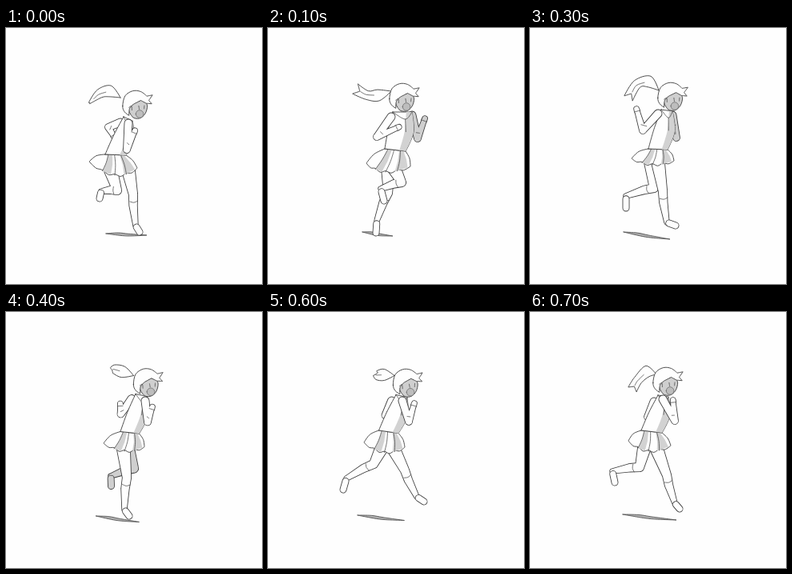
An HTML page for the animation above (800 ms loop, 320 by 320 pixels).

```html
<!DOCTYPE html>
<html lang="en">
<head>
<meta charset="utf-8">
<title>Run cycle</title>
<style>
html, body { margin: 0; width: 100%; height: 100%; overflow: hidden; background: #fefefe; }
svg { display: block; width: 100%; height: 100%; }
path { fill: #fefefe; stroke: #3c3c3c; stroke-width: .9; stroke-linejoin: round; stroke-linecap: round; }
.limb { stroke-width: 1.7; paint-order: stroke; }
.grey { fill: #cfcfcf; }
.shade { fill: #d2d2d2; stroke: none; }
.line { fill: none; stroke-width: .7; }
.mouth { fill: #bdbdbd; stroke: #666; stroke-width: .7; }
.ground { fill: #b0b0b0; stroke: #444; stroke-width: .8; }
</style>
</head>
<body>
<svg id="stage" viewBox="0 0 320 320"></svg>
<script>
const STEP = 100;
const NS = "http://www.w3.org/2000/svg";

// body: back shoulder, front shoulder, front waist, back waist
// arms: shoulder, elbow, hand; legs: hip, knee, ankle, toe
const stand = {
  head: [162, 96], tilt: 5, fork: 1, topArm: "armR", topLeg: "legP",
  tail: [[143, 87], [130, 79], [117, 82], [104, 94]],
  body: [[147, 111], [158, 116], [150, 159], [124, 158]],
  hem: [[104, 167], [136, 184], [164, 175]],
  armL: [[143, 118], [128, 124], [134, 134]],
  armR: [[153, 119], [151, 152], [160, 131]],
  legP: [[153, 178], [159, 208], [162, 247], [167, 255]],
  legQ: [[131, 178], [139, 203], [119, 204], [117, 213]],
  ground: [[125, 257], [176, 259]]
};
const push = {
  head: [168, 87], tilt: 5, fork: 7, topArm: "armL", topLeg: "legQ", dark: "armR",
  tail: [[154, 79], [138, 84], [124, 84], [109, 76]],
  body: [[156, 105], [180, 105], [172, 154], [146, 151]],
  hem: [[123, 169], [147, 180], [178, 173]],
  armL: [[154, 111], [136, 136], [161, 125]],
  armR: [[180, 109], [187, 138], [195, 116]],
  legP: [[150, 176], [150, 206], [136, 241], [135, 256]],
  legQ: [[158, 176], [167, 193], [141, 201], [145, 216]],
  ground: [[118, 255], [156, 260]]
};
const leap = {
  head: [178, 81], tilt: -4, fork: 6, topArm: "armL", topLeg: "legQ", dark: "armR legQ",
  tail: [[165, 71], [152, 65], [135, 73], [121, 87]],
  body: [[168, 97], [180, 98], [176, 152], [153, 148]],
  hem: [[127, 160], [148, 168], [181, 159]],
  armL: [[163, 103], [140, 122], [146, 104]],
  armR: [[183, 107], [194, 122], [184, 105]],
  legP: [[160, 164], [149, 190], [121, 220], [121, 236]],
  legQ: [[167, 163], [177, 203], [183, 236], [193, 242]],
  ground: [[119, 253], [187, 262]]
};
const fall = {
  head: [176, 86], tilt: 6, fork: 6, topArm: "armL", topLeg: "legQ", dark: "armR",
  tail: [[161, 78], [149, 67], [134, 70], [123, 88]],
  body: [[164, 102], [178, 104], [172, 152], [148, 151]],
  hem: [[127, 163], [153, 171], [180, 166]],
  armL: [[160, 107], [141, 128], [134, 104]],
  armR: [[178, 109], [183, 137], [179, 122]],
  legP: [[151, 168], [155, 200], [120, 210], [120, 225]],
  legQ: [[160, 168], [166, 204], [171, 243], [182, 247]],
  ground: [[117, 255], [175, 264]]
};
const pushBack = {
  head: [175, 91], tilt: 0, fork: 1, topArm: "armR", topLeg: "legQ", dark: "legP",
  tail: [[158, 81], [144, 83], [136, 73], [141, 58]],
  body: [[160, 103], [175, 107], [161, 152], [138, 148]],
  hem: [[117, 165], [143, 177], [166, 171]],
  armL: [[154, 110], [146, 127], [152, 131]],
  armR: [[170, 113], [171, 138], [185, 121]],
  legP: [[153, 172], [165, 191], [142, 200], [143, 210]],
  legQ: [[138, 174], [131, 208], [116, 237], [116, 251]],
  ground: [[108, 255], [158, 261]]
};
const fallBack = {
  head: [170, 87], tilt: 5, fork: 6, topArm: "armR", topLeg: "legP",
  tail: [[158, 78], [147, 74], [135, 85], [128, 97]],
  body: [[160, 104], [173, 106], [165, 151], [139, 148]],
  hem: [[123, 161], [148, 174], [176, 167]],
  armL: [[155, 112], [147, 131], [153, 131]],
  armR: [[166, 109], [181, 136], [179, 113]],
  legP: [[158, 170], [171, 204], [181, 239], [187, 246]],
  legQ: [[143, 169], [137, 194], [103, 199], [106, 213]],
  ground: [[116, 253], [183, 260]]
};

// Head outlines around the head centre
const FACE = [[-8, 4], [6, -6], [14, -2], [14, 7], [10, 14], [4, 17], [-3, 15]];
const HAIR = [[-16, 3], [-14, -10], [-5, -17], [5, -17], [13, -12, 1], [20, -14, 1], [16, -7, 1],
  [20, -3, 1], [13, -3, 1], [6, -6, 1], [-2, -1, 1], [-7, 5], [-7, 14, 1], [-13, 10]];

const lerp = (a, b, t) => a + (b - a) * t;
const mid = (a, b, t = .5) => [lerp(a[0], b[0], t), lerp(a[1], b[1], t)];
const sharp = p => [p[0], p[1], 1];
const shift = (p, n, k) => [p[0] + n[0] * k, p[1] + n[1] * k];

function direction(a, b) {
  const dx = b[0] - a[0], dy = b[1] - a[1], len = Math.hypot(dx, dy) || 1;
  return [dx / len, dy / len];
}
function normal(a, b) {
  const [x, y] = direction(a, b);
  return [-y, x];
}

function blend(a, b) {
  if (Array.isArray(a)) return a.map((v, i) => blend(v, b[i]));
  if (typeof a === "number") return (a + b) / 2;
  return b;
}
function between(a, b, changes) {
  const pose = {};
  for (const key in b) pose[key] = key in a ? blend(a[key], b[key]) : b[key];
  return { ...pose, ...changes };
}

// Catmull-Rom curve; points with a third value are corners.
function curve(points, closed = true) {
  const n = points.length;
  const at = i => closed ? points[(i + n) % n] : points[Math.max(0, Math.min(n - 1, i))];
  const handle = (i, side) => {
    const p = at(i), a = at(i - 1), b = at(i + 1), k = p[2] ? 0 : side / 6;
    return `${p[0] + (b[0] - a[0]) * k} ${p[1] + (b[1] - a[1]) * k}`;
  };
  let d = `M${points[0][0]} ${points[0][1]}`;
  for (let i = 0; i < n - (closed ? 0 : 1); i++) {
    const end = at(i + 1);
    d += `C${handle(i, 1)} ${handle(i + 1, -1)} ${end[0]} ${end[1]}`;
  }
  return closed ? d + "Z" : d;
}

// Tapered bar with round ends
function bar(a, b, ra, rb) {
  const n = normal(a, b);
  const at = (p, k) => shift(p, n, k).join(" ");
  return `M${at(a, ra)}L${at(b, rb)}A${rb} ${rb} 0 0 0 ${at(b, -rb)}L${at(a, -ra)}A${ra} ${ra} 0 0 0 ${at(a, ra)}Z`;
}

const ring = ([x, y], r) => `M${x - r} ${y}a${r} ${r} 0 1 1 ${2 * r} 0a${r} ${r} 0 1 1 ${-2 * r} 0Z`;

function add(parent, tag, attrs) {
  const node = document.createElementNS(NS, tag);
  for (const key in attrs) node.setAttribute(key, attrs[key]);
  return parent.appendChild(node);
}

function drawPose(pose, group) {
  const path = (kind, d) => add(group, "path", { class: kind, d });
  const line = (...points) => path("line", curve(points, false));
  const limbKind = name => (pose.dark || "").includes(name) ? "limb grey" : "limb";

  function leg(name) {
    const [hip, knee, ankle, toe] = pose[name];
    const calf = shift(mid(knee, ankle, .35), normal(knee, ankle), 1);
    const heel = mid(ankle, toe, .25);
    path(limbKind(name), bar(hip, knee, 8, 5.2) + bar(knee, calf, 5.2, 4.8) + bar(calf, ankle, 4.8, 2.8));
    path(limbKind(name), bar(heel, toe, 3.6, 3.6));
    const n = normal(knee, ankle), sock = mid(knee, ankle, .22);
    line(shift(sock, n, 4.8), shift(mid(knee, ankle, .26), n, 0), shift(sock, n, -4.8));
  }

  function arm(name) {
    const [shoulder, elbow, hand] = pose[name];
    const tip = shift(hand, direction(elbow, hand), 3);
    path(limbKind(name), bar(shoulder, elbow, 4.6, 4) + bar(elbow, hand, 4, 2.8) + bar(hand, tip, 3.2, 3));
    const n = normal(elbow, hand);
    line(shift(hand, n, 3), shift(hand, n, -3));
    const inner = mid(shoulder, elbow, .75);
    line(inner, mid(inner, mid(elbow, hand, .3)), mid(elbow, hand, .3));
  }

  function shadow() {
    const [a, b] = pose.ground;
    const at = (t, dy) => shift(mid(a, b, t), [0, 1], dy);
    path("ground", curve([sharp(a), at(.3, -1.6), at(.55, -.8), sharp(b), at(.65, 1.6), at(.4, 1.8)]));
  }

  function skirt() {
    const [, , front, back] = pose.body;
    const [left, low, right] = pose.hem;
    const hem = t => {
      const peak = shift(low, [low[0] - (left[0] + right[0]) / 2, low[1] - (left[1] + right[1]) / 2], 1);
      return mid(mid(left, peak, t), mid(peak, right, t), t);
    };
    const waves = [];
    for (let i = 1; i < 8; i++) waves.push(shift(hem(i / 8), [0, 1], i % 2 ? 1.3 : -1.3));
    const side = (a, b, k) => shift(mid(a, b), normal(a, b), k);
    path("", curve([sharp(back), side(back, left, 3), sharp(left), ...waves,
      sharp(right), side(front, right, -2), sharp(front)]));
    const fold = (t, u) => [mid(back, front, t), shift(mid(mid(back, front, t), hem(u)), [1, 0], 1), hem(u)];
    const pleat = (t, u0, u1) => path("shade", curve([...fold(t, u0), ...fold(t + .2, u1).reverse()].map(sharp)));
    pleat(.15, .25, .42);
    pleat(.7, .7, .95);
    line(...fold(.15, .25));
    line(...fold(.45, .5));
    line(...fold(.75, .75));
  }

  function torso() {
    const [rear, chest, front, back] = pose.body;
    const belly = shift(mid(chest, front), normal(chest, front), -6);
    const spine = shift(mid(rear, back), normal(rear, back), 1);
    path("", curve([sharp(rear), spine, sharp(back), mid(back, front), sharp(front), belly, sharp(chest)]));
    path("shade", curve([sharp(chest), belly, sharp(front), sharp(mid(back, front, .7)),
      mid(spine, belly, .65), sharp(mid(rear, chest, .7))]));
    const knot = shift(mid(rear, chest, .65), [0, 1], 9);
    line(rear, knot, chest);
    line(knot, mid(spine, belly, .7));
  }

  function ponytail() {
    const [root, a, b, tip] = pose.tail;
    const edge = (p, q, r, k) => shift(p, normal(q, r), k);
    const n = normal(b, tip);
    path("", curve([sharp(root), edge(a, root, b, 7), edge(b, a, tip, 5.5),
      sharp(shift(tip, n, pose.fork)), sharp(mid(tip, b, pose.fork / 18)), sharp(shift(tip, n, -pose.fork)),
      edge(b, a, tip, -5.5), edge(a, root, b, -7)]));
    line(mid(a, b, .4), mid(b, tip, .1), mid(b, tip, .55));
  }

  function head() {
    const turn = pose.tilt * Math.PI / 180, c = Math.cos(turn), s = Math.sin(turn);
    const place = ([x, y, corner]) => [pose.head[0] + x * c - y * s, pose.head[1] + x * s + y * c, corner];
    path("grey", curve(FACE.map(place)));
    path("", curve(HAIR.map(place)));
    path("mouth", ring(place([6, 11]), 4.8));
    line(...[[-8, 4], [-5, 2], [-4, 7]].map(place));
    line(...[[4, 1], [5, 5]].map(place));
    line(...[[11, 0], [11, 4]].map(place));
  }

  shadow();
  leg(pose.topLeg === "legP" ? "legQ" : "legP");
  leg(pose.topLeg);
  skirt();
  arm(pose.topArm === "armL" ? "armR" : "armL");
  torso();
  arm(pose.topArm);
  ponytail();
  head();
}

const standBack = between(fall, pushBack, { legQ: [[147, 172], [151, 207], [148, 247], [154, 255]] });
const leapBack = between(pushBack, fallBack, {
  legP: [[156, 169], [171, 198], [186, 231], [195, 237]],
  legQ: [[143, 168], [132, 190], [98, 208], [94, 222]]
});
const cycle = [stand, push, leap, fall, standBack, pushBack, leapBack, fallBack];

const stage = document.getElementById("stage");
const groups = cycle.map(pose => {
  const group = add(stage, "g", { visibility: "hidden" });
  drawPose(pose, group);
  return group;
});

function draw(time) {
  const current = Math.floor(time / STEP) % groups.length;
  groups.forEach((group, i) => group.setAttribute("visibility", i === current ? "visible" : "hidden"));
}

const start = performance.now();
function tick() {
  draw(performance.now() - start);
  requestAnimationFrame(tick);
}
tick();
</script>
</body>
</html>
```
